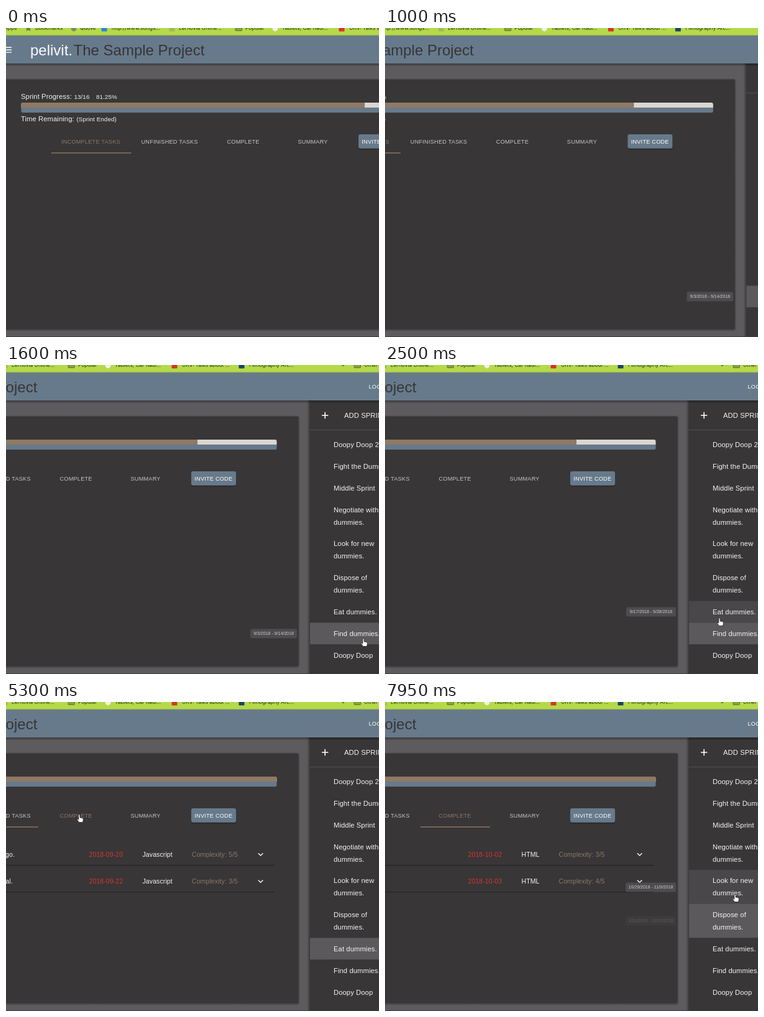
Write an HTML page that moves like this. It is 600 px wide and 497 px high and loops after 8000 ms.

```html
<!DOCTYPE html>
<html lang="en">
<head>
<meta charset="utf-8">
<title>Sprint board</title>
<style>
  html, body { margin: 0; width: 100%; height: 100%; overflow: hidden; background: #5c595c; }
  svg { display: block; width: 100vw; height: 100vh; }
  text { font-family: "Liberation Sans", Arial, sans-serif; white-space: pre; }
  .body { font-size: 11.2px; letter-spacing: .105px; fill: #f4f4f4; }
  .small { font-size: 9.8px; letter-spacing: .08px; fill: #f4f4f4; }
  .tab { font-size: 9.1px; letter-spacing: .26px; fill: #c6c4c6; }
  .row { font-size: 10.5px; letter-spacing: .1px; fill: #f4f4f4; }
  .mark { font: 8.4px Inter, "Open Sans", sans-serif; fill: #26301a; }
  .tip { font-size: 7px; fill: #d0ced0; }
</style>
</head>
<body>
<svg id="stage" viewBox="0 0 600 497" preserveAspectRatio="none" xmlns="http://www.w3.org/2000/svg"></svg>
<script>
const LOOP = 8000, PAN = 269;
const PANEL = '#383637', SLATE = '#677a8b', TAN = '#8f7963', DIM = '#8a7866';

const rect = (x, y, w, h, fill, extra = '') =>
  `<rect x="${x}" y="${y}" width="${w}" height="${h}" fill="${fill}" ${extra}/>`;
const text = (cls, x, y, str, extra = '') =>
  `<text class="${cls}" x="${x}" y="${y}" ${extra}>${str}</text>`;
const dot = (x, fill) => `<circle cx="${x}" cy="1" r="4.3" fill="${fill}"/>`;
const square = (x, fill) => rect(x - 4.5, -4, 9, 9.5, fill, 'rx="1"');
const folder = x => rect(x - 5, -3, 10.5, 7.5, '#8a9f45', 'stroke="#566b25" stroke-width=".8" rx="1"');
const grad = (id, a, b, dir) =>
  `<linearGradient id="${id}" ${dir}><stop stop-color="#000" stop-opacity="${a}"/>` +
  `<stop offset="1" stop-color="#000" stop-opacity="${b}"/></linearGradient>`;

// Sidebar sprints: first text line, row top, row height
const sprints = [
  [['Doopy Doop 2'], 110.5, 35], [['Fight the Dummies'], 145.5, 35], [['Middle Sprint'], 180.5, 35],
  [['Negotiate with', 'dummies.'], 215.5, 54.5], [['Look for new', 'dummies.'], 270, 54.5],
  [['Dispose of', 'dummies.'], 324.5, 55], [['Eat dummies.'], 379.5, 35],
  [['Find dummies.'], 414.5, 35], [['Doopy Doop'], 449.5, 35]
];
const LOOK = 4, DISPOSE = 5, EAT = 6, FIND = 7;

// Tooltips: label, centre y, fade-in time, fade-out time
const tips = [
  ['9/3/2018 - 9/14/2018', 432, -500, 2000],
  ['9/17/2018 - 9/28/2018', 397, 2050, 4010],
  ['9/17/2018 - 9/28/2018', 397, 6780, 7130],
  ['10/1/2018 - 10/12/2018', 352, 7180, 7790],
  ['10/29/2018 - 11/9/2018', 298, 7740, 9000]
];
const tipWidths = [75, 80, 80, 81, 81];

// Pointer tip on the stage: time, x, y
const path = [
  [1300, 640, 436], [1600, 575, 440], [1900, 548, 442], [2200, 540, 409], [2500, 538, 407],
  [3500, 538, 407], [3950, 421, 269], [4300, 421, 269], [5000, 118, 181], [6050, 118, 181],
  [6450, 275, 197], [6800, 536, 404], [7050, 540, 404], [7300, 552, 352], [7500, 555, 352],
  [7900, 563, 309]
];

const clamp = v => Math.max(0, Math.min(1, v));
const ease = v => { v = clamp(v); return v * v * (3 - 2 * v); };
const ramp = (t, from, len) => clamp((t - from) / len);
const mix = (a, b, k) => a + (b - a) * k;

function pointerAt(t) {
  if (t <= path[0][0]) return path[0].slice(1);
  for (let i = 1; i < path.length; i++) {
    const [t0, x0, y0] = path[i - 1], [t1, x1, y1] = path[i];
    if (t < t1) {
      const k = (t - t0) / (t1 - t0);
      const e = t1 === 6450 || t1 === 6800 ? k : ease(k);
      return [mix(x0, x1, e), mix(y0, y1, e)];
    }
  }
  return path[path.length - 1].slice(1);
}

function bookmarks() {
  const names = [
    [-3, 'Apps'], [47, 'Bookmarks'], [119, 'Quove'], [170, 'http://www.songs...'],
    [278, 'Lernovia Online...'], [385, 'Popular'], [444, 'Tablets, Car Radi...'],
    [552, 'ORV: Talks about ...'], [660, 'Filmography Arc...'], [809, '»'], [845, 'Other Bookmarks']
  ];
  return '<path d="M36-5l1.5 3.5 4 .3-3 2.5 1 3.9-3.5-2.1-3.5 2.1 1-3.9-3-2.5 4-.3z" fill="#66793c"/>' +
    dot(109, '#7b8c63') + square(158, '#2b86d9') + square(267, '#9dbb5a') + folder(374) +
    dot(433, '#f1f1ec') + square(540, '#d8322a') + square(648, '#1d4269') + folder(834) +
    names.map(([x, s]) => text('mark', x, 3.3, s)).join('');
}

function tasks(id, kind, gap, list) {
  return `<g id="${id}">` + list.map(([end, date, level], i) => {
    const y = 245 + 43.3 * i;
    return text('row', 283 - (i ? 3 : 0), y + 3.8, end, 'text-anchor="end"') +
      text('row', 402.5, y + 3.8, date, 'style="fill:#d3362f"') +
      text('row', 488.5, y + 3.8, kind) +
      text('row', gap, y + 3.8, `Complexity: ${level}/5`, `style="fill:${DIM}"`) +
      `<path d="M674.8 ${y - 1.8}l3.8 3.8 3.8-3.8" fill="none" stroke="#f4f4f4" stroke-width="1.5"/>` +
      rect(24, y + 17, 677, 1.1, '#232122');
  }).join('') + '</g>';
}

function build() {
  const tabs = [[89, 'INCOMPLETE TASKS'], [217.5, 'UNFINISHED TASKS'], [355.5, 'COMPLETE'], [469.5, 'SUMMARY']];
  const side = sprints.map(([lines, y, h], i) =>
    `<rect id="row${i}" x="758" y="${y}" width="260" height="${h}"/>` +
    lines.map((s, n) => text('body', 796, y + 21.3 + n * 19.8, s)).join('')).join('');
  const tipMarkup = tips.map(([s, y], i) => {
    const w = tipWidths[i];
    return `<g id="tip${i}">` + rect(737 - w, y - 7.5, w, 15, '#4e4c4e', 'rx="2.5"') +
      text('tip', 737 - w / 2, y + 2.4, s, 'text-anchor="middle"') + '</g>';
  }).join('');

  return `<defs>
    ${grad('down', .38, 0, 'x2="0" y2="1"')}${grad('left', 0, .35, '')}${grad('right', .3, 0, '')}
    <clipPath id="bar"><rect x="24.5" y="120" width="680" height="16.3" rx="3"/></clipPath>
  </defs>
  <g id="world">
    ${rect(-20, 0, 1100, 497, '#5e5b5e')}
    ${rect(-20, 484, 759, 4, 'url(#down)')}
    ${rect(739, 83, 3, 402, 'url(#right)')}
    ${rect(-20, 81.6, 759, 1.4, '#4a474a')}
    ${rect(-20, 83, 759.5, 401, PANEL, 'rx="2"')}
    ${text('body', 24, 113.8, 'Sprint Progress:')}
    ${text('small', 109.5, 113.6, '13/16')}${text('small', 145, 113.6, '81.25%')}
    <g clip-path="url(#bar)">
      ${rect(24, 120, 681, 8.3, '#dad6d0')}
      ${rect(24.5, 120, 552, 8.3, TAN, 'id="done"')}
      ${rect(24, 128.2, 681, 8.3, SLATE)}
    </g>
    ${text('body', 24, 150, 'Time Remaining:')}${text('small', 113.5, 150, '(Sprint Ended)')}
    ${tabs.map(([x, s], i) => text('tab', x, 185.5, s, `id="tab${i}"`)).join('')}
    <rect id="ink" y="200.3" height="1.4" fill="${TAN}"/>
    ${rect(567, 172, 72, 23.5, '#252324', 'rx="3" opacity=".7"')}
    ${rect(567, 171, 72, 22.8, SLATE, 'rx="3" id="invite"')}
    ${text('tab', 572.3, 185.5, 'INVITE CODE', 'style="fill:#fff"')}
    ${tasks('listA', 'Javascript', 568, [['ago.', '2018-09-20', 5], ['goal.', '2018-09-22', 3]])}
    ${tasks('listB', 'HTML', 548.5, [['', '2018-10-02', 3], ['', '2018-10-03', 4]])}
    ${rect(753, 57, 5, 440, 'url(#left)')}
    ${rect(757.5, 57, 300, 440, PANEL)}
    ${rect(757.5, 104, 300, 1, '#504e50')}
    <path d="M777 81h10.4M782.2 75.8v10.4" stroke="#fff" stroke-width="1.6"/>
    ${text('body', 813, 85, 'ADD SPRINT')}
    ${side}
    ${rect(-20, 57, 1100, 5, 'url(#down)')}
    ${rect(-20, 12, 1100, 45, SLATE)}
    <path d="M-3 31.3H9M-3 35.2H9M-3 39.1H9" stroke="#fff" stroke-width="1.4"/>
    <g font-size="24">
      <text x="39" y="43.5" fill="#fafafa">pelivit.</text>
      <text x="319.3" y="43.5" fill="#373537" text-anchor="end">The Sample Project</text>
    </g>
    ${text('tab', 852.5, 38.3, 'LOGOUT', 'style="fill:#fff"')}
    ${rect(-20, 0, 1100, 12, '#b4da4a')}
    ${rect(-20, 11.4, 1100, .9, '#8ba351')}
    ${bookmarks()}
    ${tipMarkup}
  </g>
  ${rect(0, 496, 600, 1, '#403a40')}
  <path id="arrow" d="M0 0V10.4L2.5 8.2 4.2 12 6 11.2 4.4 7.5H7.6Z" fill="#151515" stroke="#fff" stroke-width=".9"/>
  <path id="hand" d="M-1.2 1C-1.2-.7 1.1-.7 1.1 1V4.9L4.6 5.6Q6.6 6 6.4 8L5.6 12.6H-.5L-3.5 8.6Q-3.8 6.9-2.4 7.2L-1.2 8.3Z" fill="#fff" stroke="#1c1c1c" stroke-width=".8"/>`;
}

const stage = document.getElementById('stage');
stage.innerHTML = build();
const parts = {};
stage.querySelectorAll('[id]').forEach(el => { parts[el.id] = el; });
const set = (id, name, value) => parts[id].setAttribute(name, value);
const show = (id, on) => set(id, 'opacity', on ? 1 : 0);

function update(t) {
  set('world', 'transform', `translate(${-PAN * ease((t - 195) / 1330)} 0)`);

  const [x, y] = pointerAt(t);
  const overSide = x > 489;
  const hand = overSide || (y > 168 && y < 206 && x < 371);
  for (const id of ['arrow', 'hand']) set(id, 'transform', `translate(${x} ${y})`);
  show('hand', hand);
  show('arrow', !hand);

  const chosen = t < 3520 ? FIND : t < 7430 ? EAT : DISPOSE;
  sprints.forEach(([, top, h], i) => {
    const hover = overSide && t > 1300 && y >= top && y < top + h;
    set('row' + i, 'fill', i === chosen ? '#5c595c' : hover ? '#494749' : PANEL);
  });

  tips.forEach(([, , a, b], i) => set('tip' + i, 'opacity', ramp(t, a, 200) * (1 - ramp(t, b, 210))));

  set('done', 'width', 680 * mix(.8125, 1, ease(ramp(t, 3560, 380))));

  const slide = ease(ramp(t, 5150, 300));
  set('ink', 'x', mix(73, 326, slide));
  set('ink', 'width', mix(128.5, 112, slide));
  const complete = t >= 5150;
  parts.tab0.style.fill = complete ? '' : DIM;
  parts.tab2.style.fill = complete ? DIM : '';
  show('listA', complete && t < 7450);
  show('listB', t >= 7450);
  set('invite', 'fill', t > 6380 && t < 6600 ? '#4e6071' : SLATE);
}

const start = performance.now();
function tick() {
  update((performance.now() - start) % LOOP);
  requestAnimationFrame(tick);
}
update(0);
requestAnimationFrame(tick);
</script>
</body>
</html>
```
